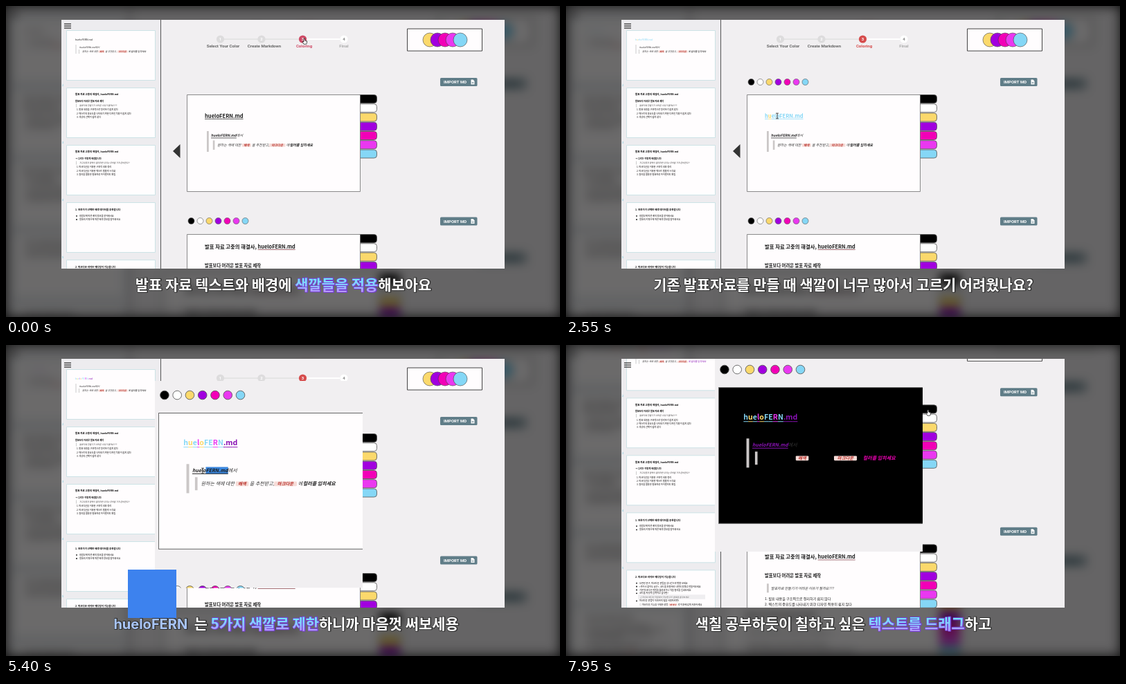
Animation, 800 px wide and 450 px high, one loop 8 s. Source, as an HTML page with a canvas:

```html
<!DOCTYPE html>
<html lang="ko">
<head>
<meta charset="utf-8">
<title>Coloring slides</title>
<style>
html, body { margin: 0; width: 100%; height: 100%; overflow: hidden; background: #222; }
canvas { display: block; }
</style>
</head>
<body>
<canvas id="stage" width="800" height="450"></canvas>
<script>
const LOOP = 8000;
const stage = document.getElementById('stage').getContext('2d');
const page = Object.assign(document.createElement('canvas'), { width: 800, height: 450 });
const pageCtx = page.getContext('2d');
let g = stage;

const KR = '"Noto Sans CJK KR", "Noto Sans CJK JP", "Noto Sans CJK", "Noto Sans", sans-serif';
const LATIN = 'Roboto, "Noto Sans", sans-serif';
const BRAND = 'hueloFERN', DOC = BRAND + '.md';
const INK = '#1c1c1c', BG = '#f1eff1', SELECT = '#3a86dd', VIOLET = '#8a12b5';
const [YELLOW, PURPLE, PINK, MAGENTA, BLUE] = ['#fbd96c', '#a100df', '#f200b7', '#ea38f0', '#85d7f6'];
const PALETTE = ['#000', '#fff', YELLOW, PURPLE, PINK, MAGENTA, BLUE];

// time, first letter, end letter, colour, how long the selection shows before
const PAINTS = [
  [1800, 0, 12, BLUE, 900], [2350, 1, 2, YELLOW, 350], [2900, 3, 4, MAGENTA, 350],
  [3400, 4, 5, YELLOW, 300], [3950, 7, 8, MAGENTA, 400], [4450, 9, 12, VIOLET, 300]
];
// time, x, y, shape
const POINTER = [
  [0, 431, 50, 'hand'], [300, 431, 50, 'arrow'], [700, 360, 150, 'beam'], [900, 342, 160, 'beam'],
  [1250, 287, 160, 'arrow'], [1500, 311, 130, 'arrow'], [1700, 345, 111, 'hand'], [2000, 294, 159, 'beam'],
  [2300, 294, 112, 'hand'], [2550, 305, 159, 'beam'], [2850, 332, 112, 'hand'], [3100, 312, 159, 'beam'],
  [3370, 294, 112, 'hand'], [3600, 321, 159, 'arrow'], [3750, 331, 116, 'arrow'], [3930, 333, 112, 'hand'],
  [4180, 340, 159, 'beam'], [4420, 307, 112, 'hand'], [4750, 359, 148, 'beam'], [5150, 359, 148, 'beam'],
  [5320, 318, 182, 'beam'], [5450, 268, 182, 'arrow'], [5620, 284, 74, 'arrow'], [5900, 340, 140, 'beam'],
  [6150, 364, 160, 'beam'], [6350, 475, 163, 'beam'], [6650, 428, 163, 'arrow'], [6900, 310, 56, 'arrow'],
  [7080, 302, 37, 'hand'], [7300, 420, 70, 'arrow'], [7650, 523, 97, 'hand'], [8000, 523, 97, 'hand']
];
const CAPTIONS = [
  [0, [['발표 자료 텍스트와 배경에 '], ['색깔들을 적용', 1], ['해보아요']]],
  [2350, [['기존 발표자료를 만들 때 색깔이 너무 많아서 고르기 어려웠나요?']]],
  [4300, [[BRAND, 2], ['  는 '], ['5가지 색깔로 제한', 1], ['하니까 마음껏 써보세용']]],
  [6500, [['색칠 공부하듯이 칠하고 싶은 '], ['텍스트를 드래그', 1], ['하고']]]
];

const clamp = v => Math.max(0, Math.min(1, v));
const lerp = (a, b, k) => a + (b - a) * k;
const ease = v => { v = clamp(v); return v * v * (3 - 2 * v); };

function box(x, y, w, h, fill, stroke, r = 0, lw = 1) {
  g.beginPath();
  g.roundRect(x, y, w, h, r);
  if (fill) { g.fillStyle = fill; g.fill(); }
  if (stroke) { g.strokeStyle = stroke; g.lineWidth = lw; g.stroke(); }
}

function disc(x, y, r, fill, stroke) {
  g.beginPath();
  g.arc(x, y, r, 0, 7);
  g.fillStyle = fill;
  g.fill();
  if (stroke) { g.strokeStyle = stroke; g.lineWidth = .6; g.stroke(); }
}

function shape(points, fill, stroke) {
  g.beginPath();
  points.forEach(([x, y]) => g.lineTo(x, y));
  g.closePath();
  g.fillStyle = fill;
  g.fill();
  if (stroke) { g.strokeStyle = stroke; g.lineWidth = .8; g.stroke(); }
}

// y is the middle of the line; returns the end x
function text(str, x, y, size, color = INK, style = '', family = KR) {
  g.font = `${style} ${size}px ${family}`;
  g.fillStyle = color;
  g.fillText(str, x, y + size * .36);
  return x + g.measureText(str).width;
}

function underline(x0, x1, y, color) {
  g.fillStyle = color;
  g.fillRect(x0, y, x1 - x0, .7);
}

function titleColors(t) {
  const colors = Array(DOC.length).fill(INK);
  for (const [at, from, to, color] of PAINTS) if (t >= at) colors.fill(color, from, to);
  return colors;
}

function title(x, y, size, t, main) {
  const colors = titleColors(t), style = main ? '700' : '500';
  g.font = `${style} ${size}px ${KR}`;
  const at = i => x + g.measureText(DOC.slice(0, i)).width;
  const edges = Array.from({ length: DOC.length + 1 }, (_, i) => at(i));
  const sel = main && PAINTS.find(p => t >= p[0] - p[4] && t < p[0]);
  let left = Infinity, right = 0;
  if (sel) {
    right = edges[sel[2]];
    left = lerp(right, edges[sel[1]], clamp((t - sel[0] + sel[4]) / 330));
    g.fillStyle = SELECT;
    g.fillRect(left, y - 5.5, right - left, 11);
  }
  [...DOC].forEach((ch, i) => {
    const picked = edges[i] >= left - .5 && edges[i] < right;
    text(ch, edges[i], y, size, picked ? '#fff' : colors[i], style);
    if (main) underline(edges[i], edges[i + 1], y + 4.2, colors[i]);
  });
  if (main && t > 4600 && t < 5300) {
    g.fillStyle = INK;
    g.fillRect(edges[12] + .3, y - 5, .7, 10);
  }
}

function chip(str, x, w, y, size) {
  box(x, y - size * .48, w, size * .96, '#f6dcd8', null, .8);
  g.textAlign = 'center';
  text(str, x + w / 2, y, size * .9, '#b8302a', 'italic 700');
  g.textAlign = 'left';
}

function swatches(y) {
  PALETTE.forEach((c, i) => disc(267.5 + 13 * i, y, 4.5, c, '#555'));
}

function firstCard(t) {
  const dark = t >= 7700;
  if (t > 700) swatches(110);
  box(261.5, 128.5, 250, 140, dark ? '#000' : '#fffdfe', '#666', 0, .75);
  title(287, 159, 7.55, t, true);
  g.fillStyle = '#cbc7c7';
  g.fillRect(290, 181, 2.8, 30);
  g.fillRect(298.8, 194.5, 2.6, 13.5);

  const nameColor = t > 5650 ? VIOLET : INK;
  g.font = `italic 700 5px ${KR}`;
  const end = 296 + g.measureText(DOC).width;
  const nameSel = t > 5320 && t < 5650;
  let nameLeft = end;
  if (nameSel) {
    nameLeft = lerp(end, 296, clamp((t - 5320) / 130));
    box(nameLeft, 184, end - nameLeft, 7, SELECT);
  }
  text(DOC, 296, 187.5, 5, nameSel && nameLeft === 296 ? '#fff' : nameColor, 'italic 700');
  underline(296, end, 190.6, nameColor);
  text('에서', end, 187.5, 5, '#333', 'italic');

  const y = 201.3, plain = dark ? '#000' : '#333';
  text('원하는 색에 대한', 305, y, 5, plain, 'italic');
  chip('배색', 340.7, 13.2, y, 5);
  text('을 추천받고,', 355, y, 5, plain, 'italic');
  chip('마크다운', 380, 23.5, y, 5);
  text('에', 404.7, y, 5, plain, 'italic');
  const tailSel = t > 6350 && t < 7100;
  let tailLeft = 443.5;
  if (tailSel) {
    tailLeft = lerp(443.5, 409.8, clamp((t - 6350) / 300));
    box(tailLeft, 197.8, 443.5 - tailLeft, 7.2, SELECT);
  }
  const tailColor = tailLeft < 410 ? '#fff' : t >= 7100 ? PINK : INK;
  text('컬러를 입히세요', 409.8, y, 5, tailColor, 'italic 700');
}

function tabs(y) {
  PALETTE.forEach((c, i) => box(510.5, y + 13.25 * i, 25, 12, c, '#555', [0, 4, 4, 0], .8));
}

function importButton(y) {
  box(627, y, 53.5, 12, '#607d88', null, 1.5);
  text('IMPORT MD', 632, y + 6, 6, '#fff', '700', LATIN);
  shape([[671.5, y + 2.5], [674.5, y + 2.5], [676.5, y + 4.7], [676.5, y + 9.5], [671.5, y + 9.5]], '#fff');
  g.fillStyle = '#607d88';
  g.fillRect(672.7, y + 6, 2.6, .7);
  g.fillRect(672.7, y + 7.5, 2.6, .7);
}

function header(t) {
  const hover = t < 400;
  g.fillStyle = '#e2e1e2';
  g.fillRect(315, 47.2, 108, 1.6);
  g.fillStyle = '#fff';
  g.fillRect(434, 47, 48, 2);
  const red = hover ? '#cf4a66' : '#d64c4c';
  [['Select Your Color', 313.5], ['Create Markdown', 373], ['Coloring', 430.5], ['Final', 488]].forEach(([label, lx], i) => {
    const x = 309.5 + 59.5 * i;
    disc(x, 48, 5.6, ['#dddcdd', '#dddcdd', red, '#fff'][i]);
    g.textAlign = 'center';
    text(i + 1, x, 48, 6, i < 3 ? '#fff' : '#888', '700', LATIN);
    text(label, lx, 57.7, 6.1, ['#666', '#666', red, '#aaa'][i], '700', LATIN);
    g.textAlign = 'left';
  });
  box(579.5, 33, 108, 32, '#fffdfe', '#444');
  PALETTE.slice(2).forEach((c, i) => disc(612 + 11 * i, 49, 10, c, '#444'));
}

function thumbTitle(y) {
  text('발표 자료 고충의 해결사, ' + DOC, 100, y, 3.5, '#000', '700');
}

function lines(list, x, y, step, size = 3.2, color = '#000') {
  list.forEach((s, i) => text(s, x, y + step * i, size, color));
}

function bullets(list, y, step) {
  list.forEach((s, i) => {
    disc(102, y + step * i, .9, '#000');
    text(s, 106, y + step * i, 3.2, '#000');
  });
}

function bar(x, y, h) {
  g.fillStyle = '#ccc';
  g.fillRect(x, y, 1, h);
}

function thumbnails(t) {
  for (let i = 0; i < 6; i++) {
    const y = 36 + 83 * i;
    box(87.5, y - .5, 128, 72, '#fffdfe', '#c3dfe2', 0, .8);
    if (i) text(i + 1, 81, y - 4, 4, '#71c2d8');
  }
  title(100, 49, 3.6, t, false);
  bar(100.5, 56, 13);
  bar(105, 63, 6);
  text(DOC + '에서', 106, 59.5, 3.3, t > 5650 ? VIOLET : '#222', 'italic');
  let x = text('원하는 색에 대한 ', 110, 66, 3.3, '#222', 'italic');
  chip('배색', x, 9, 66, 3.4);
  x = text(' 을 추천받고, ', x + 9, 66, 3.3, '#222', 'italic');
  chip('마크다운', x, 15, 66, 3.4);
  text(' 에 컬러를 입히세요', x + 15, 66, 3.3, t >= 7100 ? VIOLET : '#000', 'italic');

  thumbTitle(128);
  text('발표보다 어려운 발표 자료 제작', 100, 138, 3.2, '#000', '700');
  bar(101, 141.5, 5);
  text('발표자료 만들기가 어려운 이유가 뭘까요???', 106, 144, 3, '#333', 'italic');
  lines(['1. 발표 내용을 구조적으로 정리하기 쉽지 않다', '2. 텍스트의 중요도를 나타내기 위한 디자인 적용이 쉽지 않다', '3. 색상의 선택이 쉽지 않다'], 102, 150.3, 5.2);

  thumbTitle(211);
  text('→ 우리는 이렇게 해결합니다', 100, 221, 3.2, '#000', '700');
  bar(101, 224.5, 5);
  text('자고리즘과 협력이 열리려면 우리는 무엇을 가져 준비한다!!', 106, 227, 3, '#333', 'italic');
  lines(['1. 마크다운을 이용한 구조적 내용 정리', '2. 마크다운을 이용한 텍스트 템플릿 시각화', '3. 컬러를 활용한 발표자료 아이덴티티 확립'], 102, 233.3, 5.2);

  text('1. 전문가가 선택한 배색 데이터를 추천합니다', 100, 295, 3.5, '#000', '700');
  bullets(['컬럼부에 따른 배색 정보를 알아봐서요', '필통의 키워드에 따른 배색 정보를 알아봐서요'], 303.8, 5.2);

  text('2. 마크다운 라이브 에디팅이 가능합니다', 100, 377.8, 3.5, '#000', '700');
  bullets(['오픈된 문구, 마크다운 문법을 실시간으로 변환 보세요', '+마우스 없이도 글은+, 코드를 조절하여 나만의 동영상 만들어보세요', '기본 마크다운 파일을 올려보거나 직접 컬러를 입혀보세요', '코드를 자유자 입력하고 싶다면?'], 386.3, 4.9);
  box(104, 403, 97, 6.5, '#efeef0');
  text('// 라이브 에디터 작업에서 작성한 코드 블록을 옮겨보세요', 107, 406.3, 3, '#666', 'italic');
  bullets(['마크다운 문법이 익숙하지 않을 사용자라면?'], 412, 5);
  x = text('○ 마크다운 기능을 구체한 설명 ', 106, 417.2, 3.2, '#000');
  chip('배 하나', x, 13, 417.2, 3.3);
  text(' 로 이용해 쉽게 사용하세요', x + 13, 417.2, 3.2, '#000');
}

function secondCard() {
  swatches(311);
  box(261.5, 330.5, 250, 140, '#fffdfe', '#666', 0, .75);
  const x = text('발표 자료 고충의 해결사, ', 287, 348.5, 7.35, INK, '700');
  const end = text(DOC, x, 348.5, 7.35, INK, '700');
  underline(x, end, 352.3, '#7b3038');
  text('발표보다 어려운 발표 자료 제작', 287, 375.7, 6.3, INK, '700');
  g.fillStyle = '#cbc7c7';
  g.fillRect(290, 387, 2.8, 13);
  text('발표자료 만들기가 어려운 이유가 뭘까요???', 296, 394, 5.05, '#333', 'italic');
  lines(['1. 발표 내용을 구조적으로 정리하기 쉽지 않다', '2. 텍스트의 중요도를 나타내기 위한 디자인 적용이 쉽지 않다'], 287, 409.2, 7.6, 5.1, INK);
}

function drawPage(t, scroll) {
  box(80, 20, 640, 360, BG);
  g.save();
  g.beginPath();
  g.rect(80, 20, 640, 360);
  g.clip();
  box(80, 20, 143, 360, '#edecef');
  g.save();
  g.translate(0, -scroll);
  thumbnails(t);
  header(t);
  importButton(104);
  importButton(305.5);
  tabs(128.5);
  tabs(330.5);
  firstCard(t);
  secondCard();
  g.restore();
  g.fillStyle = '#555';
  g.fillRect(223, 20, 1, 360);
  shape([[241, 210], [251.5, 200], [251.5, 220]], '#333');
  g.fillStyle = '#333';
  for (let i = 0; i < 3; i++) g.fillRect(84, 25.3 + 3 * i, 10, 1.3);
  g.restore();
}

function drawZoom(t, k, s) {
  const left = lerp(258, 215, k), right = lerp(511, 515, k);
  const top = lerp(lerp(95, 52, k), 20, s), bottom = lerp(lerp(308, 351.5, k), 299, s);
  const scale = lerp(1, 1.405, k);
  g.save();
  g.beginPath();
  g.rect(left, top, right - left, bottom - top);
  g.clip();
  box(left, top, right - left, bottom - top, BG);
  g.translate(lerp(262, 221.2, k), lerp(128, 97.8, k) - 37 * s);
  g.scale(scale, scale);
  g.translate(-262, -128);
  firstCard(t);
  swatches(311);
  g.restore();
}

function drawPointer(t) {
  const i = POINTER.findIndex(p => p[0] > t), a = POINTER[i - 1], b = POINTER[i];
  const k = ease((t - a[0]) / (b[0] - a[0]));
  g.save();
  g.translate(lerp(a[1], b[1], k), lerp(a[2], b[2], k));
  if (a[3] === 'beam') {
    g.fillStyle = '#444';
    g.fillRect(-.5, -4, 1, 8);
    g.fillRect(-2, -4.3, 4, .9);
    g.fillRect(-2, 3.5, 4, .9);
  } else if (a[3] === 'hand') {
    shape([[-1, -3], [.6, -3], [.8, 0], [3.6, .8], [3.4, 3.6], [2.6, 5.2], [-1, 5.2], [-3, 2], [-2.4, 1.2], [-1, 2]], '#fff', '#222');
  } else {
    shape([[0, 0], [0, 5.6], [1.3, 4.5], [2.3, 6.6], [3.3, 6.1], [2.4, 4.1], [4, 4]], '#fff', '#333');
  }
  g.restore();
}

function drawCaption(t) {
  const parts = CAPTIONS.filter(c => t >= c[0]).pop()[1];
  const font = kind => kind === 2 ? '700 20px Inter, sans-serif' : `700 20.9px ${KR}`;
  const widths = parts.map(([s, kind]) => { g.font = font(kind); return g.measureText(s).width; });
  let x = 400.5 - widths.reduce((a, b) => a + b) / 2 + (parts[0][1] ? 4 : 0);
  const y = 410.5;
  g.lineJoin = 'round';
  parts.forEach(([s, kind], i) => {
    g.font = font(kind);
    g.strokeStyle = kind === 1 ? '#743fd0' : '#303030';
    g.lineWidth = 2;
    g.strokeText(s, x + .5, y + .5);
    if (kind === 1) {
      const fill = g.createLinearGradient(0, y - 17, 0, y + 3);
      fill.addColorStop(0, '#70edff');
      fill.addColorStop(.55, '#8bc7ff');
      fill.addColorStop(1, '#b996ff');
      g.fillStyle = fill;
    } else g.fillStyle = kind === 2 ? '#a9c5f8' : '#fff';
    g.fillText(s, x, y);
    x += widths[i];
  });
}

function drawBackdrop() {
  g.fillStyle = '#efedef';
  g.fillRect(0, 0, 800, 450);
  g.filter = 'blur(7px)';
  g.drawImage(page, 80, 20, 640, 360, 0, 0, 800, 450);
  g.filter = 'none';
  g.fillStyle = 'rgba(0,0,0,.58)';
  g.fillRect(0, 0, 800, 450);
  g.save();
  g.shadowColor = 'rgba(0,0,0,.85)';
  g.shadowBlur = 18;
  g.lineWidth = 40;
  g.strokeStyle = '#000';
  g.strokeRect(-20, -20, 840, 490);
  g.restore();
}

function draw(t) {
  const s = ease((t - 5720) / 200), k = ease((t - 4450) / 160);
  g = pageCtx;
  drawPage(t, 41.7 * s);
  g = stage;
  drawBackdrop();
  g.drawImage(page, 80, 20, 640, 360, 80, 20, 640, 360);
  if (k > 0) drawZoom(t, k, s);
  drawPointer(t);
  if (t >= 4300 && t < 6500) box(176, 325, 70, 70, '#3d82ee');
  drawCaption(t);
}

const start = performance.now();
function frame() {
  draw((performance.now() - start) % LOOP);
  requestAnimationFrame(frame);
}
frame();
</script>
</body>
</html>
```
